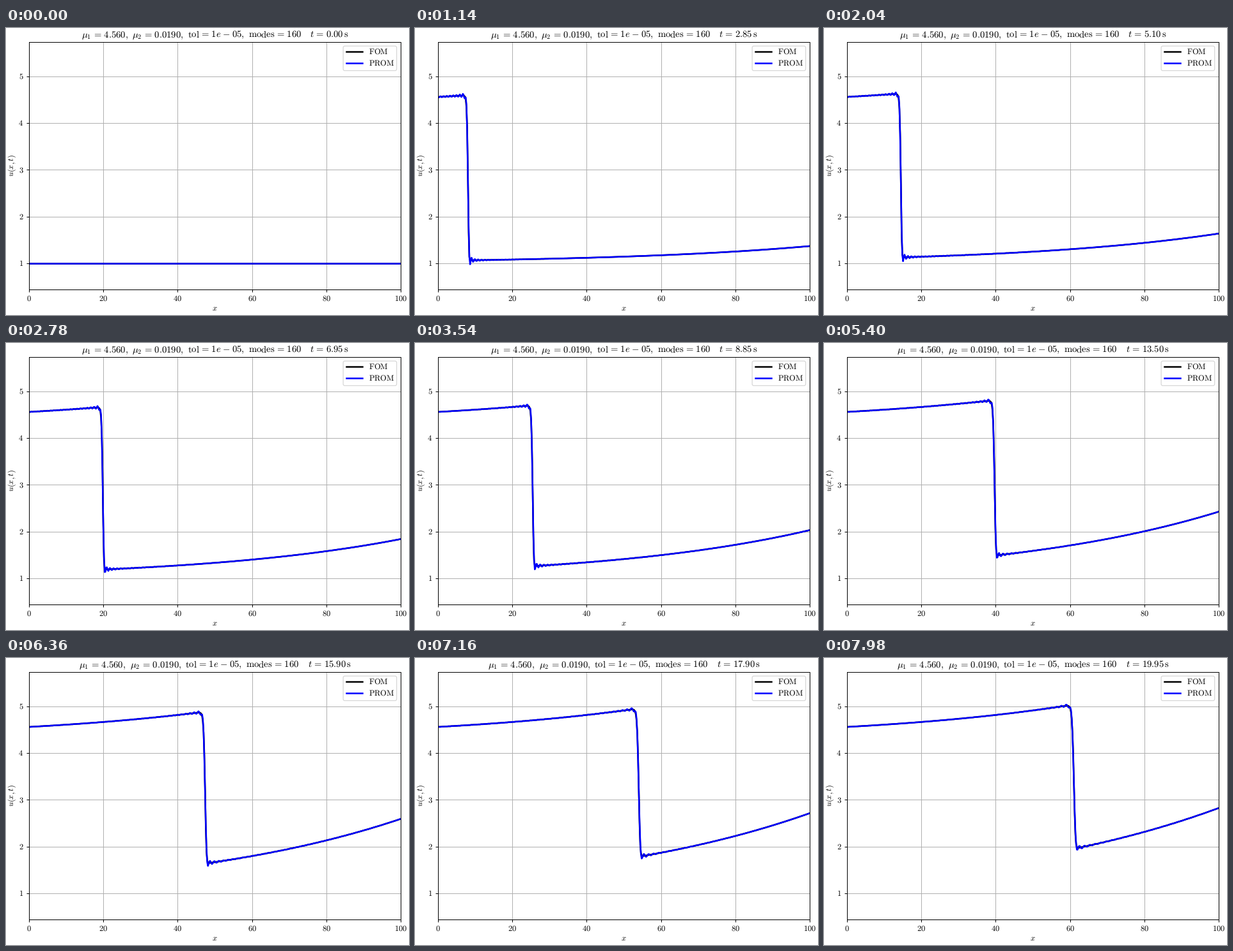
A matplotlib script for the animation above (8 s loop, 630 by 450 pixels).

```python
import numpy as np
import matplotlib.pyplot as plt
from matplotlib.animation import FuncAnimation
from matplotlib.patches import FancyBboxPatch

W, H, DPI = 630, 450, 90
FRAMES, INTERVAL = 400, 20
STEPS, DT = 500, 0.05
CELLS, SUB = 511, 4          # plotted cells, finer cells inside each
MODES = 160
MU1, MU2 = 4.56, 0.019
UPWIND = 0.75                # 0.5 is centred, 1 is fully upwind

plt.rcParams["mathtext.fontset"] = "cm"
plt.rcParams["text.hinting"] = "none"


def solve_burgers(mu1, mu2):
    """u_t + (u^2/2)_x = 0.02 exp(mu2 x), implicit Euler box scheme.

    All parameter pairs are solved together, one space-time diagonal at a time.
    """
    m = CELLS * SUB
    h = 100 / m
    mid = (np.arange(m) + 0.5) * h
    force = 0.02 * np.exp(np.outer(mu2, mid))
    u = np.ones((len(mu1), STEPS + 1, m + 1))
    u[:, 1:, 0] = mu1[:, None]
    r = h / DT
    p = r * UPWIND
    for d in range(2, STEPS + m + 1):
        n = np.arange(max(1, d - m), min(STEPS, d - 1) + 1)
        i = d - n
        left = u[:, n, i - 1]
        q = (2 * (r - p) * (left - u[:, n - 1, i - 1]) - 2 * p * u[:, n - 1, i]
             - left**2 - 2 * h * force[:, i - 1])
        u[:, n, i] = np.sqrt(p * p - q) - p
    return u[:, :, ::SUB].copy()


def reduce(train, u):
    """Project u on the leading modes of the training snapshots."""
    snaps = train.reshape(-1, CELLS + 1) - 1
    vecs = np.linalg.eigh(snaps.T @ snaps)[1][:, -MODES:]
    return 1 + (u - 1) @ vecs @ vecs.T


grid1, grid2 = np.meshgrid([4.25, 4.875, 5.5], [0.015, 0.0225, 0.03])
sol = solve_burgers(np.append(grid1, MU1), np.append(grid2, MU2))
x = np.linspace(0, 100, CELLS + 1)
fom = sol[-1]
prom = reduce(sol[:-1], fom)

# Plot area, in pixels from the top left
L, R, T, B = 36.1, 616.9, 22.1, 409.8
Y0, Y1 = 0.443, 5.733

fig = plt.figure(figsize=(W / DPI, H / DPI), dpi=DPI, facecolor="white")
ax = fig.add_axes([L / W, 1 - B / H, (R - L) / W, (B - T) / H])
ax.set(xlim=(0, 100), ylim=(Y0, Y1), xticks=range(0, 101, 20), yticks=range(1, 6))
ax.tick_params(labelbottom=False, labelleft=False)
ax.grid(True)
fom_line, = ax.plot([], [], "k", lw=2)
prom_line, = ax.plot([], [], "b", lw=2)

page = fig.add_axes([0, 0, 1, 1], zorder=5)
page.set(xlim=(0, W), ylim=(H, 0))
page.axis("off")


def label(px, py, tex, size=10, ha="left", **kw):
    return page.text(px, py, f"${tex}$", fontsize=size, ha=ha, va="baseline", **kw)


for v in range(0, 101, 20):
    label(L + (R - L) * v / 100, 428, v, ha="center")
for v in range(1, 6):
    label(27.3, B - (B - T) * (v - Y0) / (Y1 - Y0) + 4.2, v, ha="right")
label((L + R) / 2, 443, "x", ha="center")
label(13.1, (T + B) / 2, "u(x,t)", ha="center", rotation=90, rotation_mode="anchor")

page.add_patch(FancyBboxPatch((527.1, 28.3), 83.6, 38.5,
                              boxstyle="round,pad=0,rounding_size=2.5",
                              fc="white", ec="0.8", lw=1, alpha=0.8))
for py, name, color in ((37.3, "FOM", "k"), (54.65, "PROM", "b")):
    page.plot([532.1, 557.1], [py, py], color, lw=2)
    label(567, py + 4.7, rf"\mathrm{{{name}}}")

# Wider spacing around relations and signs, as TeX sets it
EQ = r"\hspace{0.123}=\hspace{0.123}"
MINUS = r"\hspace{0.058}-\hspace{0.058}"
PARTS = [
    (117.6, rf"\mu_1{EQ}4.560,"),
    (197.1, rf"\mu_2{EQ}0.0190,"),
    (283.7, rf"\mathrm{{tol}}{EQ}1e{MINUS}05,"),
    (379, rf"\mathrm{{modes}}{EQ}160"),
    (475.4, "t"),
]
title = [label(px, 15, tex, 11.75) for px, tex in PARTS]


def update(k):
    t = k * DT
    shift = -3.6 if t > 9.999 else 0
    for part, (px, _) in zip(title, PARTS):
        part.set_x(px + shift)
    title[-1].set_text(rf"$t{EQ}{t:.2f}\,\mathrm{{s}}$")
    fom_line.set_data(x, fom[k])
    prom_line.set_data(x, prom[k])
    return [fom_line, prom_line, *title]


anim = FuncAnimation(fig, update, frames=FRAMES, interval=INTERVAL,
                     init_func=lambda: update(0), repeat=True, repeat_delay=0)
plt.show()
```
